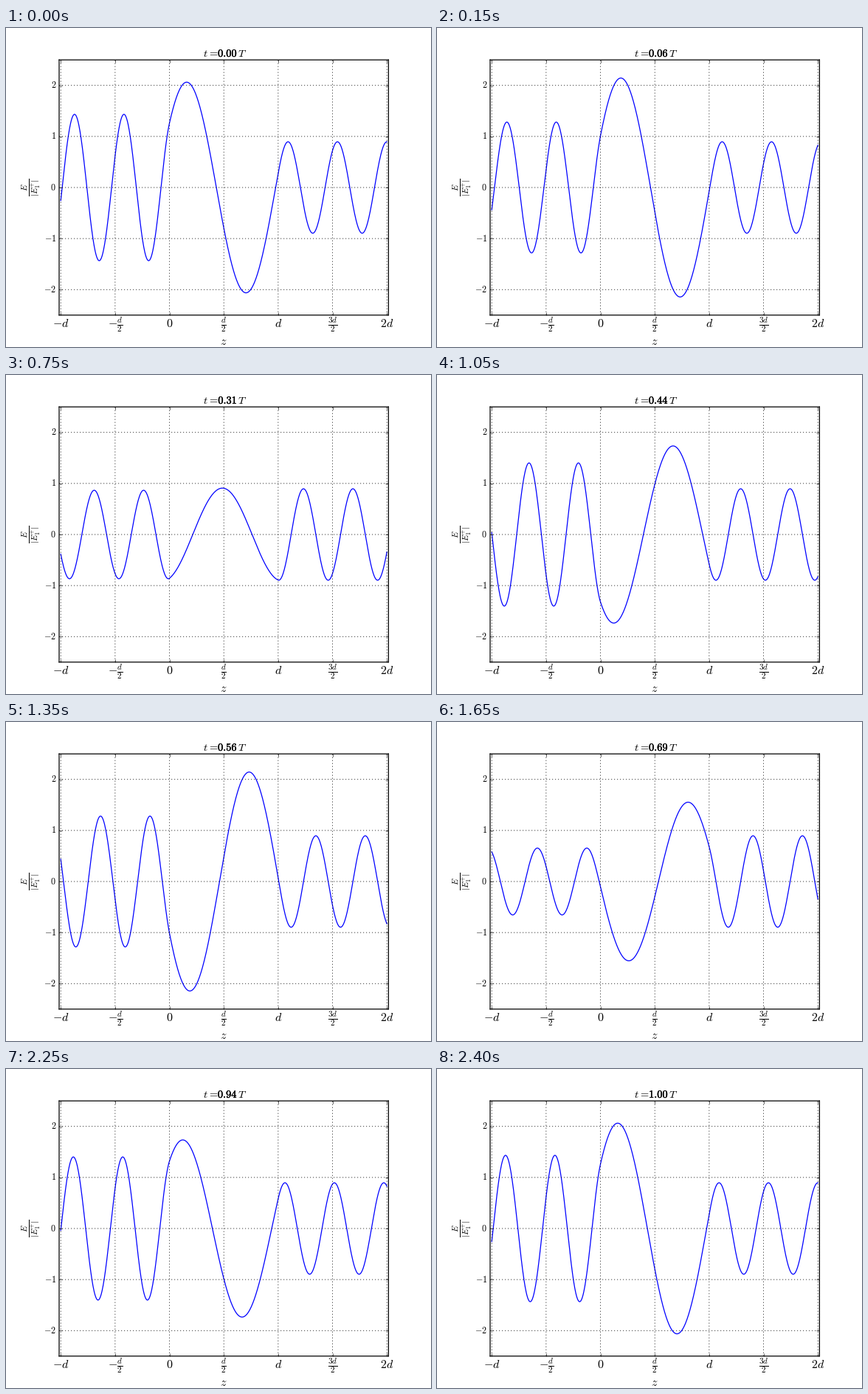
These frames come from a looping animation (576x432 px, 2550 ms). A matplotlib script:

```python
import numpy as np
import matplotlib.pyplot as plt
from matplotlib.animation import FuncAnimation
from matplotlib.patheffects import withStroke

W, H, DPI = 576, 432, 72
STEPS = 16                # time steps per wave period
N = 2.4                   # index ratio, outside to slab
K1 = 2 * np.pi * 2.2      # wavenumber outside, lengths in units of d
K2 = K1 / N               # wavenumber in the slab

plt.rcParams.update({
    "mathtext.fontset": "cm",
    "lines.scale_dashes": False,
    "axes.axisbelow": False,
    "axes.linewidth": 1.25,
})


def complex_field(z):
    """Steady wave through a slab at 0..1, incident amplitude 1."""
    amp = 1 / np.hypot(np.cos(K2), (N + 1 / N) / 2 * np.sin(K2))
    out = amp * np.exp(-1j * K1)     # field at z = 1, crest at z = 2
    u = K2 * (z - 1)
    slab = out * (np.cos(u) + 1j * N * np.sin(u))
    # value and scaled slope at z = 0, matched to the left-hand wave
    value = out * (np.cos(K2) - 1j * N * np.sin(K2))
    slope = out * (np.sin(K2) / N + 1j * np.cos(K2))
    left = value * np.cos(K1 * z) + slope * np.sin(K1 * z)
    right = out * np.exp(1j * K1 * (z - 1))
    return np.where(z < 0, left, np.where(z < 1, slab, right))


def label(x, y, text, size, **kw):
    """Text at pixel x, y measured from the top left."""
    kw = {"ha": "center", "va": "baseline", **kw}
    return fig.text(x / W, 1 - y / H, text, fontsize=size, **kw)


def clock(t):
    return rf"$\mathbf{{{t:.2f}}}$"


fig = plt.figure(figsize=(W / DPI, H / DPI), dpi=DPI, facecolor="white")
ax = fig.add_axes([0.125, 0.1, 0.775, 0.8])
ax.set_xlim(-1.015, 2.015)
ax.set_ylim(-2.5, 2.5)

ax.set_xticks(np.arange(-1, 2.1, 0.5))
ax.set_xticklabels(
    [r"$-d$", r"$-\frac{d}{2}$", r"$0$", r"$\frac{d}{2}$", r"$d$",
     r"$\frac{3d}{2}$", r"$2d$"], fontsize=16, va="baseline")
ax.set_yticks(range(-2, 3))
ax.set_yticklabels([f"${v}$" for v in range(-2, 3)], fontsize=12, va="center")
ax.tick_params(direction="in", length=4, width=0.6, top=True, right=True)
ax.tick_params(axis="x", pad=16)
ax.tick_params(axis="y", pad=4)
ax.grid(True, color="black", linewidth=0.75, linestyle=(0, (1.2, 2.8)))
for part in [*ax.spines.values(), *ax.get_xgridlines(), *ax.get_ygridlines()]:
    part.set_snap(False)

label(295.2, 429, r"$z$", 16)
label(34.6, 216, r"$\frac{E}{|E_1^{+}|}$", 16, rotation=90, va="center")
label(267, 38.8, r"$t\hspace{0.08}=$", 14.4, ha="left")
label(326, 38.8, r"$T$", 14.4, ha="right")
digits = label(300.5, 38.8, clock(0), 14.4)
digits.set_path_effects([withStroke(linewidth=0.4, foreground="black")])

z = np.linspace(-1, 2, 901)
field = complex_field(z)
line, = ax.plot(z, field.real, color="blue", linewidth=1.25)


def update(i):
    t = i / STEPS
    line.set_ydata((field * np.exp(-2j * np.pi * t)).real)
    digits.set_text(clock(t))
    return line, digits


anim = FuncAnimation(fig, update, frames=STEPS + 1, interval=150,
                     repeat=True, repeat_delay=0, blit=False)
plt.show()
```
